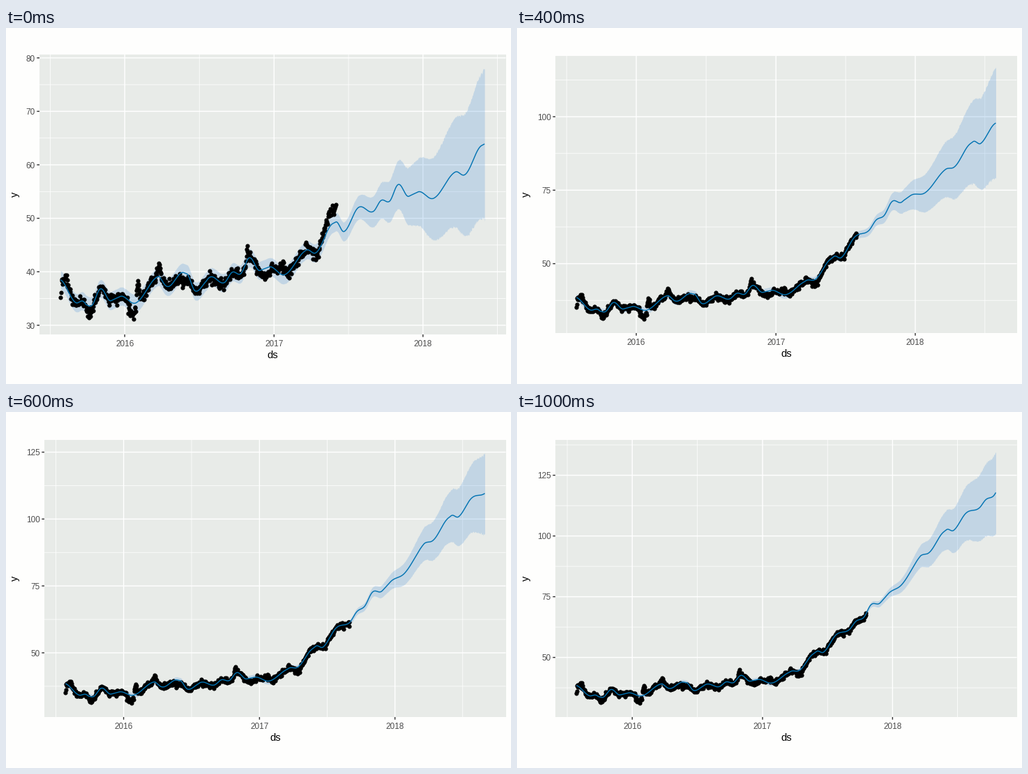
A matplotlib script for the animation above (1.2 s loop, 724 by 510 pixels).

```python
import numpy as np
import matplotlib.pyplot as plt
from matplotlib.animation import FuncAnimation
from matplotlib.patches import Rectangle

W, H, DPI = 724, 510, 64
PT = 72 / DPI                      # points per pixel
RIGHT = 716.5
FIRST_DAY, HORIZON = -157, 365     # days are counted from 1 Jan 2016
PAPER, PANEL = "#fefefd", "#e8ebe8"
LINE, BAND = "#0072B2", "#2a7fd4"
YEARS = {2016: 0, 2017: 366, 2018: 731}
MID_YEARS = (-182.5, 183, 548.5, 913.5)

plt.rcParams["font.family"] = "Liberation Sans"

# Turning points of the yearly cycle: days after 1 June, offset
SEASON = np.array([(0, 0), (21, -2.6), (57, 0.5), (92, -1.7), (112, -0.4),
                   (131, -1.4), (153, 0.9), (180, -2.35), (200, -2.4),
                   (241, -5.15), (293, -2.35), (316, -3.8), (358, 0), (365, 0)])
# Bends of the long-term trend: day, level
TREND = [(-157, 38), (-95, 34.5), (85, 41.6), (200, 38.2), (440, 46.2), (510, 51.6)]
# Passing departures of the observations: day, size, width in days
SHOCKS = [(-157, -3, 2), (-142, 1.4, 9), (-89, -1.6, 8), (18, -2.6, 9), (32, 4, 4),
          (83, 2, 5), (143, -1.8, 14), (300, 2.4, 3), (347, -1.6, 12),
          (385, 2, 8), (470, -1.8, 9)]


def season(day):
    day_of_cycle = (day - 152) % 365
    turns, offsets = SEASON.T
    i = np.searchsorted(turns, day_of_cycle, "right") - 1
    u = (day_of_cycle - turns[i]) / (turns[i + 1] - turns[i])
    return offsets[i] + (offsets[i + 1] - offsets[i]) * (1 - np.cos(np.pi * u)) / 2


class View:
    """One forecast made on day `cut`, with its own axes scale.

    `ahead` holds the trend at the cut, on days 700 and 810, and at the end.
    """

    def __init__(self, cut, box, scale, ticks, spread, ahead):
        self.cut, self.ticks = cut, ticks
        self.left, self.top, self.bottom = box
        self.y50, self.unit = scale
        end = cut + HORIZON
        self.days = np.arange(FIRST_DAY, end + 1)

        bends = [p for p in TREND if p[0] < cut - 30]
        bends += zip((cut, 700, 810, end), ahead)
        self.line = np.interp(self.days, *zip(*bends)) + season(self.days)

        base, reach = spread
        width = base + reach * np.clip((self.days - cut) / HORIZON, 0, 1) ** 1.7
        noise = np.random.default_rng(cut).normal(1, 0.014, (2, len(width)))
        self.high = self.line + width * noise[0]
        self.low = self.line - width * noise[1]

    def x(self, day):
        share = (day - FIRST_DAY) / (self.cut + HORIZON - FIRST_DAY)
        return self.left + (RIGHT - self.left) * (0.05 + share) / 1.1

    def y(self, value):
        return self.y50 - (value - 50) * self.unit

    def y_grid(self):
        start, step = self.ticks
        for k in range(-4, 16):
            value = start + k * step / 2
            if self.top < self.y(value) < self.bottom:
                yield value, k % 2 == 0


LOW_BOX, HIGH_BOX = (48, 38, 439), (55, 40, 437)
VIEWS = [
    View(517, LOW_BOX, (272.6, 7.66), (30, 10), (1.7, 12.4), (49.3, 56.6, 61.0, 63.9)),
    View(546, LOW_BOX, (325.7, 4.917), (30, 20), (1.3, 24.5), (56.2, 66.6, 70.9, 80.8)),
    View(577, HIGH_BOX, (337.6, 4.21), (50, 25), (1.2, 17.6), (59.1, 73.8, 84.4, 97.4)),
    View(608, HIGH_BOX, (345.0, 3.833), (50, 25), (1.1, 14), (62.9, 76.0, 93.2, 111.3)),
    View(638, HIGH_BOX, (350.0, 3.573), (50, 25), (1.0, 16.5), (64.5, 75.5, 94.2, 115.3)),
    View(656, HIGH_BOX, (351.6, 3.48), (50, 25), (1.0, 15.9), (68.5, 75.4, 94.2, 118.6)),
]


def observations(view):
    """Daily values scattered around the fitted curve of the latest view."""
    days = view.days[view.days <= view.cut]
    values = view.line[:len(days)].copy()
    for day, size, width in SHOCKS:
        values += size * np.exp(-((days - day) / width) ** 2)
    return days, values + np.random.default_rng(4).normal(0, 0.5, len(days))


OBS_DAYS, OBS = observations(VIEWS[-1])

fig = plt.figure(figsize=(W / DPI, H / DPI), dpi=DPI, facecolor=PAPER)
ax = fig.add_axes([0, 0, 1, 1])


def segment(x, y, color, width, z):
    ax.plot(x, y, color=color, lw=width * PT, solid_capstyle="butt",
            snap=False, zorder=z)


def label(x, y, text, size=11.7, color="#4d4d4d", **kw):
    ax.text(x, y, text, fontsize=size * PT, color=color,
            **{"ha": "center", "va": "center_baseline", **kw})


def draw_axes(v):
    ax.add_patch(Rectangle((v.left, v.top), RIGHT - v.left, v.bottom - v.top,
                           fc=PANEL, ec="none", zorder=0))
    for day in MID_YEARS:
        if v.left < v.x(day) < RIGHT:
            segment([v.x(day)] * 2, [v.top, v.bottom], "white", 0.75, 1)
    for value, major in v.y_grid():
        y = v.y(value)
        segment([v.left, RIGHT], [y, y], "white", 1.42 if major else 0.75, 1 + major)
        if major:
            segment([v.left - 3.7, v.left], [y, y], "#333333", 1.42, 2)
            label(v.left - 6.4, y + 0.3, f"{value:.0f}", ha="right")
    for year, day in YEARS.items():
        x = v.x(day)
        segment([x, x], [v.top, v.bottom], "white", 1.42, 2)
        segment([x, x], [v.bottom, v.bottom + 3.7], "#333333", 1.42, 2)
        label(x, v.bottom + 12.3, str(year))
    label((v.left + RIGHT) / 2, v.bottom + 28.5, "ds", 14.67, "black")
    label(13, 238.5, "y", 14.67, "black", rotation=90, va="center")


def draw(i):
    v = VIEWS[i]
    ax.clear()
    ax.set(xlim=(0, W), ylim=(H, 0))
    ax.axis("off")
    draw_axes(v)
    x = v.x(v.days)
    ax.fill_between(x, v.y(v.low), v.y(v.high), color=BAND, alpha=0.2, lw=0, zorder=3)
    seen = OBS_DAYS <= v.cut
    ax.plot(v.x(OBS_DAYS[seen]), v.y(OBS[seen]), "o", color="black",
            ms=6.2 * PT, mew=0, zorder=4)
    segment(x, v.y(v.line), LINE, 1.42, 5)
    return []


anim = FuncAnimation(fig, draw, frames=len(VIEWS), init_func=lambda: [],
                     interval=200, repeat=True, repeat_delay=0)
plt.show()
```
